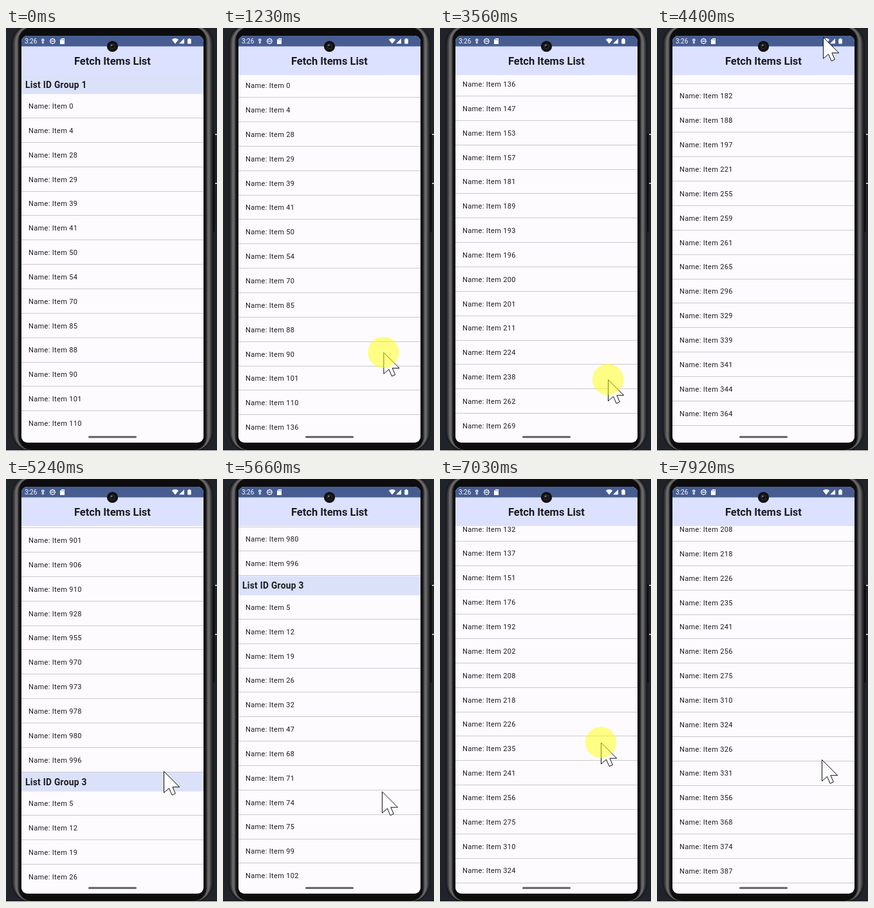
Recreate the animation shown at these times as an HTML page with a canvas. Size 328 by 656 pixels, loop 7990 ms.

```html
<!DOCTYPE html>
<html lang="en">
<head>
<meta charset="utf-8">
<title>Fetch Items List</title>
<style>
html, body { margin: 0; width: 100%; height: 100%; overflow: hidden; background: #20242a; }
canvas { display: block; width: 328px; height: 656px; }
</style>
</head>
<body>
<canvas id="stage"></canvas>
<script>
const W = 328, H = 656, LOOP = 7990, STEP = 70;
const ROW = 37.85, HEAD = 29.7, LIST_TOP = 72.7, LIST_END = 627.4;
const FONT = 'Roboto, "Noto Sans", sans-serif';
const INK = '#1a1b20';
const canvas = document.getElementById('stage');
const ctx = canvas.getContext('2d');
const dpr = window.devicePixelRatio || 1;
canvas.width = W * dpr;
canvas.height = H * dpr;

// ---- list content: "a..b" stands for random ids between a and b ----
const groups = [
  '0 4 28 29 39 41 50 54 70 85 88 90 101 110 136 147 153 157 181 189 193 196 200 201 211 224 238 262 269 272..998',
  '2..180 182 188 197 221 255 259 261 265 296 329 339 341 344 364 368..899 901 906 910 928 955 970 973 978 980 996',
  '5 12 19 26 32 47 68 71 74 75 99 102 132 137 151 176 192 202 208 218 226 235 241 256 275 310 324 326 331 356 368 374 387'
];
let seed = 11;
const rand = () => (seed = (seed * 16807) % 2147483647) / 2147483647;
function expand(part) {
  const [from, to = from] = part.split('..').map(Number);
  const ids = [];
  for (let n = from; n <= to; n += 2 + Math.floor(rand() * 16)) ids.push(n);
  return ids;
}
const rows = [];
let end = LIST_TOP;
groups.forEach((ids, g) => {
  rows.push({ y: end, head: true, text: `List ID Group ${g + 1}` });
  end += HEAD;
  for (const n of ids.split(' ').flatMap(expand)) {
    rows.push({ y: end, g, n, text: `Name: Item ${n}` });
    end += ROW;
  }
});
// Scroll offset that puts item n of group g at the given screen height
const at = (g, n, top) => rows.find(r => r.g === g && r.n === n).y - top;

// ---- motion ----
// Smooth curve through [time, value] points without overshoot
function curve(pts) {
  const d = pts.slice(1).map((p, i) => (p[1] - pts[i][1]) / (p[0] - pts[i][0]));
  const m = pts.map((p, i) => {
    const a = d[i - 1], b = d[i];
    return a * b > 0 ? 2 * a * b / (a + b) : 0;
  });
  return t => {
    if (t <= pts[0][0]) return pts[0][1];
    const i = pts.findIndex(p => p[0] >= t);
    if (i < 0) return pts[pts.length - 1][1];
    const [t0, v0] = pts[i - 1], [t1, v1] = pts[i];
    const h = t1 - t0, u = (t - t0) / h, w = 1 - u;
    return v0 * (1 + 2 * u) * w * w + v1 * u * u * (3 - 2 * u)
      + h * u * w * (m[i - 1] * w - m[i] * u);
  };
}

const rest1 = at(0, 41, 64.4), rest2 = at(0, 136, 68.4), slow = at(2, 32, 82.9);
const scrollAt = curve([
  [1020, 0], [1700, rest1], [2200, rest1], [2680, rest2], [3620, rest2],
  [4400, at(1, 182, 86.9)], [5240, at(1, 901, 76.4)], [6220, slow],
  [6500, slow + 100], [6810, slow + 100], [7170, at(2, 208, 59.4)]
]);

// Pointer moves: start, end, x, y
const moves = [
  [200, 820, 249, 575], [1020, 1420, 250, 370], [1500, 2060, 245, 579],
  [2200, 2680, 243, 295], [2880, 3340, 261, 545], [3620, 4260, 258, 14],
  [4400, 5200, 245, 453], [5240, 6220, 250, 533], [6220, 6480, 250, 575],
  [6810, 7170, 250, 242], [7700, 7900, 256, 435]
];
const presses = [[890, 1500], [2120, 2880], [3360, 3900], [6500, 7100]];

function pointerAt(t) {
  let x = 259, y = 493;
  for (const [a, b, toX, toY] of moves) {
    const u = Math.min(1, Math.max(0, (t - a) / (b - a)));
    const e = u * u * (3 - 2 * u);
    x += (toX - x) * e;
    y += (toY - y) * e;
  }
  return [x, y];
}

// ---- drawing helpers ----
function box(x, y, w, h, color, r = 0) {
  ctx.fillStyle = color;
  ctx.beginPath();
  ctx.roundRect(x, y, w, h, r);
  ctx.fill();
}
function disc(x, y, r, color) {
  ctx.fillStyle = color;
  ctx.beginPath();
  ctx.arc(x, y, r, 0, 7);
  ctx.fill();
}
function poly(pts, color) {
  ctx.fillStyle = color;
  ctx.beginPath();
  pts.forEach(p => ctx.lineTo(p[0], p[1]));
  ctx.closePath();
  ctx.fill();
}
function label(text, x, y, font, color, spacing = 0, align = 'left') {
  ctx.font = `${font} ${FONT}`;
  ctx.letterSpacing = `${spacing}px`;
  ctx.textAlign = align;
  ctx.fillStyle = color;
  ctx.fillText(text, x, y);
}

function drawPhone() {
  box(0, 0, W, H, '#20242a');
  for (const y of [164, 240]) {
    box(321, y, 3.5, 76, '#0c0d0f', 1);
    box(325, y, 3, 2, '#b9babc');
  }
  box(8.5, -6, 314, 662, '#161718', 30);
  const shades = ['#2c2c2d', '#4a4a4c', '#6f6f71', '#5a5a5c', '#262627'];
  shades.forEach((c, i) => {
    const x = 10 + i * 2.2;
    box(x, -5 + i, 2 * (165.5 - x), 660 - i, c, 29 - i * 2);
  });
  box(20.5, -1, 290, 655, '#0d0d0e', 19);
  box(0, 655, W, 1, '#f4f4f4');
}

function drawStatus() {
  box(24, 12, 283, 16.4, '#475d92');
  label('3:26', 29, 24, '10px', '#fff');
  disc(57.3, 18.8, 2.2, '#fff');
  disc(57.3, 18.8, 0.9, '#475d92');
  box(56.8, 20.5, 1, 4, '#fff');
  box(55.3, 22.3, 4, 1, '#fff');
  ctx.strokeStyle = '#fff';
  ctx.lineWidth = 1.2;
  ctx.beginPath();
  ctx.arc(72.4, 20.4, 3.6, 0, 7);
  ctx.stroke();
  box(70, 19.8, 4.8, 1.3, '#fff');
  for (let i = 0; i < 8; i++) {
    const a = i * Math.PI / 4;
    disc(72.4 + 4.2 * Math.cos(a), 20.4 + 4.2 * Math.sin(a), 0.6, '#fff');
  }
  poly([[86.5, 16], [91, 16], [91, 25], [84, 25], [84, 18.5]], '#fff');
  for (let i = 0; i < 3; i++) box(86.3 + i * 1.5, 17.2, 0.7, 1.8, '#475d92');

  ctx.fillStyle = '#fff';
  ctx.beginPath();
  ctx.moveTo(263, 24.4);
  ctx.lineTo(257.8, 18);
  ctx.quadraticCurveTo(263, 14, 268.2, 18);
  ctx.fill();
  poly([[269, 24.2], [277, 24.2], [277, 16.2]], '#fff');
  box(282.2, 17, 5.6, 7.6, '#fff', 1);
  box(283.8, 16, 2.4, 2, '#fff');
}

function drawList(scroll) {
  ctx.save();
  ctx.beginPath();
  ctx.rect(24, 73, 283, LIST_END - 73);
  ctx.clip();
  for (const r of rows) {
    const y = r.y - scroll;
    if (y < 20 || y > LIST_END) continue;
    if (r.head) {
      box(24, y, 283, HEAD, '#dbe1f9');
      label(r.text, 30, y + 19.9, 'bold 13.76px', INK, 0.29);
    } else {
      label(r.text, 35, y + 22.58, '11px', INK, 0.344);
      box(24, Math.round(y + ROW - 1.2), 283, 1, '#cac9cc');
    }
  }
  ctx.restore();
}

function drawScreen(scroll) {
  ctx.save();
  ctx.beginPath();
  ctx.roundRect(24, 12, 283, 631, 9);
  ctx.clip();
  box(24, 12, 283, 631, '#fefbff');
  drawList(scroll);
  box(24, 28, 283, 45, '#dbe1ff');
  label('Fetch Items List', 165.4, 57.2, 'bold 16.5px', INK, 0, 'center');
  drawStatus();
  box(128, 632.8, 75, 3, '#606064', 1.5);
  ctx.restore();
  disc(165.5, 28.5, 8.6, '#101011');
  disc(165.5, 28.5, 4.6, '#272729');
  disc(165.5, 28.5, 2.6, '#0b0b0d');
  disc(164.3, 27, 1.4, '#77777b');
}

function drawPointer(x, y, pressed) {
  ctx.save();
  ctx.translate(x + 0.5, y + 0.5);
  poly([[0, 0], [0, 33], [8, 26], [12.7, 36.7], [17.8, 34.4], [13.4, 24.2], [24.2, 24.2]], '#fff');
  ctx.strokeStyle = '#000';
  ctx.lineWidth = 0.95;
  ctx.stroke();
  ctx.restore();
  if (pressed) disc(x, y, 24.2, 'rgba(255, 255, 10, 0.5)');
}

const start = performance.now();
function frame(now) {
  const t = Math.max(0, now - start) % LOOP;
  // The screen refreshes once per step, on a grid 10 ms early
  const shown = Math.floor((t + 10) / STEP) * STEP - 10;
  ctx.setTransform(dpr, 0, 0, dpr, 0, 0);
  drawPhone();
  drawScreen(scrollAt(shown));
  if (t >= 200) drawPointer(...pointerAt(shown), presses.some(([a, b]) => t >= a && t < b));
  requestAnimationFrame(frame);
}
frame(start);
</script>
</body>
</html>
```
